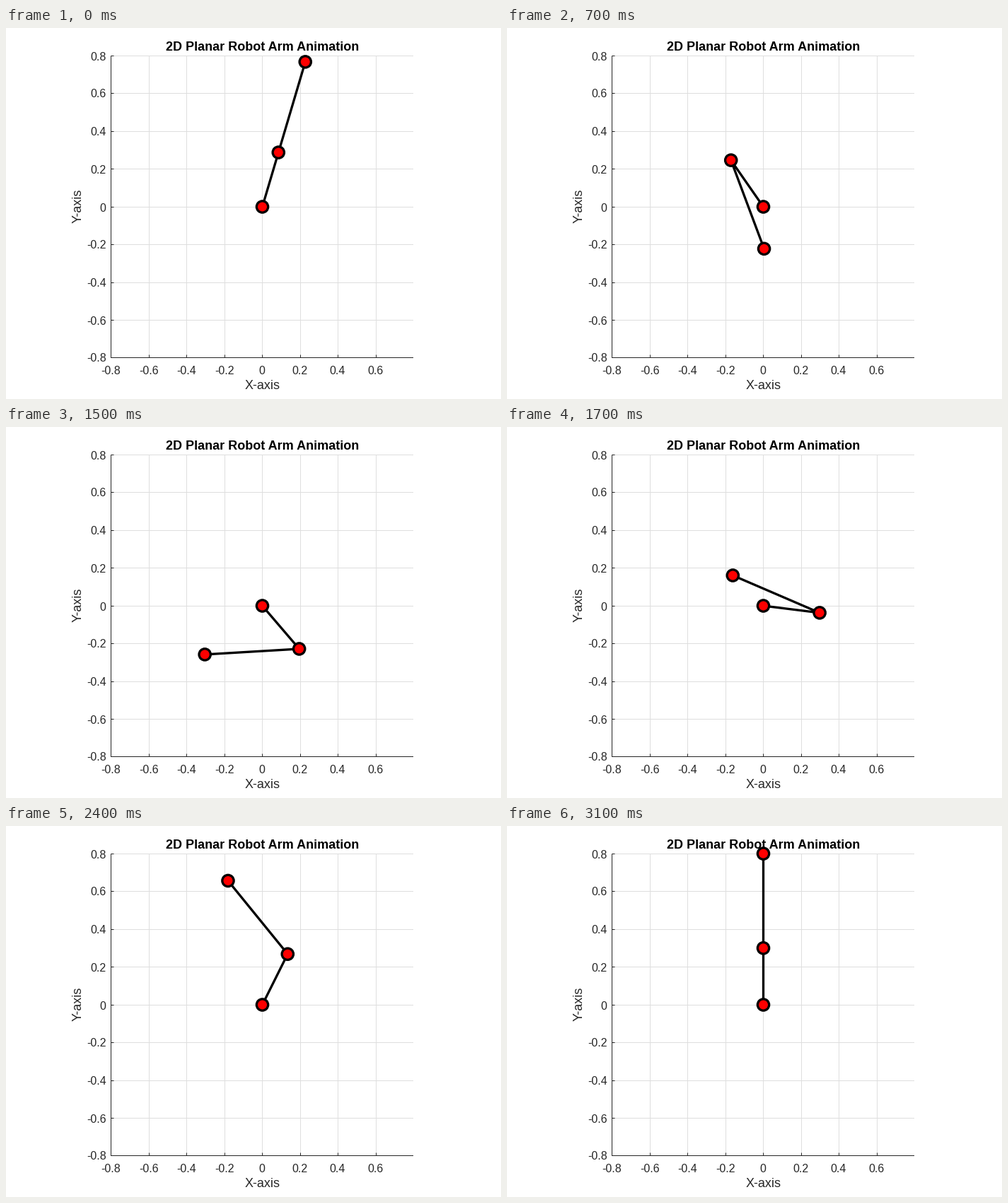
Recreate the animation shown at these times as a matplotlib script. Size 700 by 525 pixels, loop 3.2 s.

```python
import numpy as np
import matplotlib.pyplot as plt
from matplotlib.animation import FuncAnimation
from matplotlib.patches import Circle

W, H, DPI = 700, 525, 100
PX = 72 / DPI                      # points per pixel
FRAMES, STEP_MS = 32, 100
HOLD = 5                           # the pose is held for one extra step here
UNIT = 267.4                       # pixels per data unit
BASE = np.array([362.5, 253])
LINKS = 0.3, 0.5
LEFT, RIGHT, TOP, BOTTOM = 148.5, 576, 39.5, 466.5
INK = "#262626"
GRID = "#dedede"

# Key poses: step, inner and outer link angle in degrees
KEYS = np.array([(0, 73.5, 73.5), (3, 87.5, 168), (6, 124.8, 290.5),
                 (11, 235.7, 505.75), (13, 286.1, 545.3), (16, 352.9, 516.7),
                 (20, 400.5, 489), (23, 423.5, 489.1), (27, 444.6, 479.5),
                 (30, 450, 450)])
KNOTS = KEYS[:, 0] / KEYS[-1, 0]


def basis(u):
    """Cubic spline terms at u, smooth at every inner knot."""
    powers = [u ** p for p in range(4)]
    return np.array(powers + [max(u - k, 0) ** 3 for k in KNOTS[2:-2]])


WEIGHTS = np.linalg.solve([basis(u) for u in KNOTS], np.radians(KEYS[:, 1:]))


def pose(frame):
    step = frame if frame <= HOLD else frame - 1
    angles = basis(step / (FRAMES - 2)) @ WEIGHTS
    points = [BASE]
    for length, a in zip(LINKS, angles):
        points.append(points[-1] + UNIT * length * np.array([np.cos(a), -np.sin(a)]))
    return np.array(points)


fig = plt.figure(figsize=(W / DPI, H / DPI), dpi=DPI, facecolor="white")
ax = fig.add_axes([0, 0, 1, 1])
ax.set_xlim(0, W)
ax.set_ylim(H, 0)
ax.axis("off")


def rule(x, y, color, z):
    ax.plot(x, y, color=color, lw=PX, zorder=z, solid_capstyle="butt", snap=False)


def label(x, y, text, size=16, color=INK, **kw):
    kw = {"ha": "center", "va": "baseline", **kw}
    ax.text(x, y, text, fontsize=size * PX, color=color,
            family="Liberation Sans", zorder=3, **kw)


def draw_axes():
    for k in range(-4, 5):
        text = f"{k / 5:.1f}" if k else "0"
        x = round(362.2 + 53.5 * k) + 0.5
        y = round(252.75 - 53.43 * k) + 0.5
        if k < 4:
            rule([x, x], [TOP, BOTTOM], GRID, 1)
            rule([x, x], [BOTTOM, BOTTOM - 4], INK, 2)
            label(x - 0.7, 489.5, text)
        rule([LEFT, RIGHT], [y, y], GRID, 1)
        rule([LEFT, LEFT + 4], [y, y], INK, 2)
        label(141.6, y + 6, text, ha="right")
    rule([LEFT, LEFT], [TOP, BOTTOM + 0.5], INK, 2)
    rule([LEFT - 0.5, RIGHT], [BOTTOM, BOTTOM], INK, 2)
    label(363, 32, "2D Planar Robot Arm Animation", 18, "black", weight="bold")
    label(362.5, 511, "X-axis", 18)
    label(106.5, 252, "Y-axis", 18, rotation=90, rotation_mode="anchor")


draw_axes()
arm, = ax.plot(*pose(0).T, color="black", lw=3.3 * PX, zorder=5, snap=False)
joints = [ax.add_patch(Circle(p, 8.15, fc="red", ec="black", lw=3.3 * PX, zorder=6))
          for p in pose(0)]


def update(frame):
    points = pose(frame)
    arm.set_data(*points.T)
    for joint, p in zip(joints, points):
        joint.center = p
    return [arm, *joints]


anim = FuncAnimation(fig, update, frames=FRAMES, interval=STEP_MS,
                     repeat=True, repeat_delay=0)
plt.show()
```
